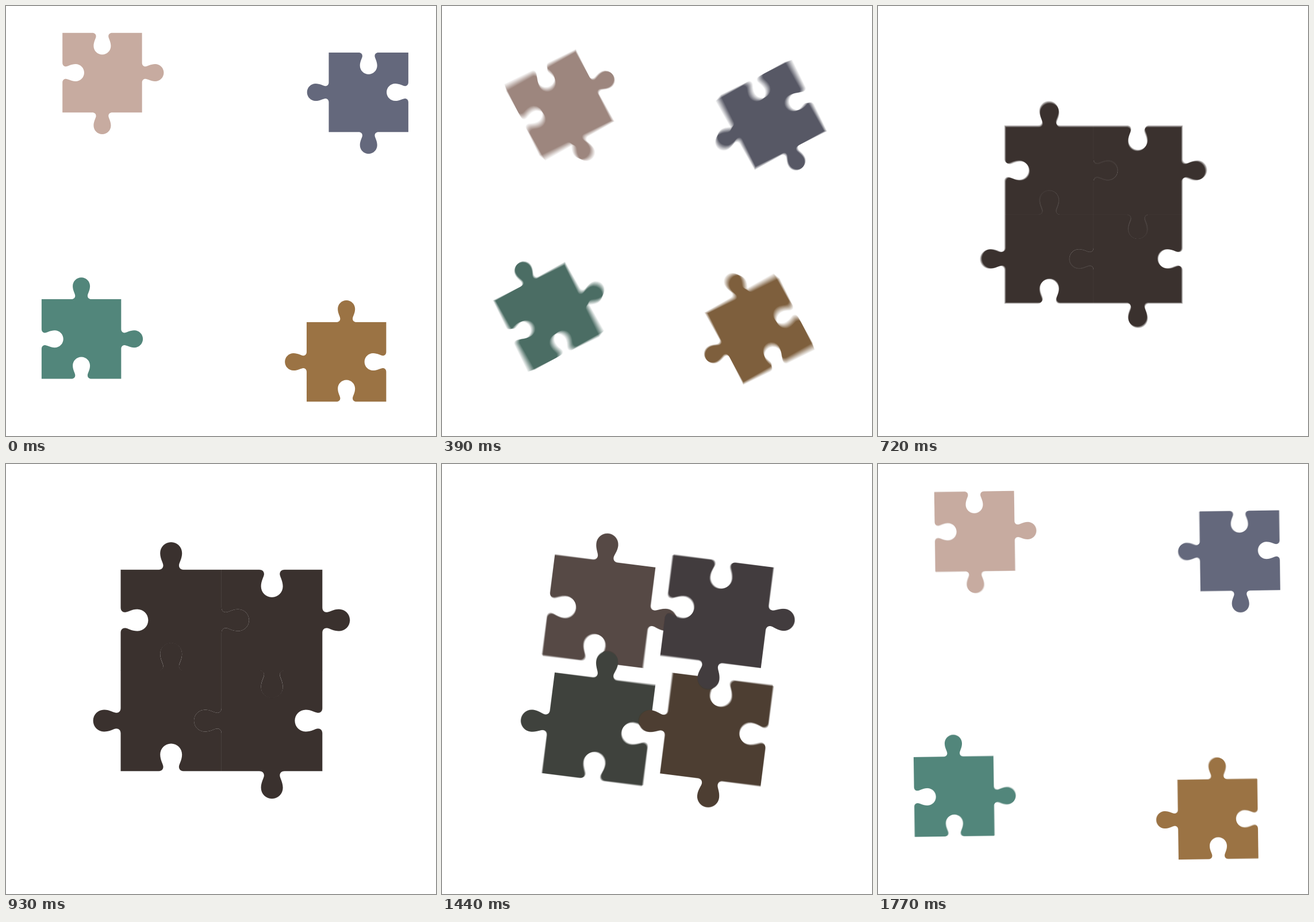
These frames come from a looping animation (748x748 px, 1.8 s). An HTML page with a canvas:

```html
<!DOCTYPE html>
<html lang="en">
<head>
<meta charset="utf-8">
<title>Puzzle pieces</title>
<style>
  html, body { margin: 0; width: 100%; height: 100%; overflow: hidden; background: #fff; }
  canvas { display: block; }
</style>
</head>
<body>
<canvas id="stage" width="748" height="748"></canvas>
<script>
const STAGE = 748, LOOP = 1800, STEP = 30;
const SHUTTER = 15, SAMPLES = 16;
const SMALL = 138.4, LARGE = 179.7;
const DARK = [58, 49, 46];
const TAB = 18.9; // half of a knob's length: from square centre to bounding-box centre

// x, y: scattered square centre; sx, sy: quadrant in the assembled puzzle
const pieces = [
  { x: 167.4, y: 116, sx: -1, sy: -1, color: [199, 171, 160] },
  { x: 131.1, y: 579.2, sx: -1, sy: 1, color: [82, 134, 123] },
  { x: 592.2, y: 619.1, sx: 1, sy: 1, color: [155, 115, 68] },
  { x: 630.7, y: 150.1, sx: 1, sy: -1, color: [100, 104, 124] }
];

const ctx = document.getElementById('stage').getContext('2d');
const layer = document.createElement('canvas');
layer.width = layer.height = STAGE;
const pen = layer.getContext('2d');

const mix = (a, b, p) => a + (b - a) * p;
const clamp = v => Math.min(1, Math.max(0, v));

// Cubic timing curve with flat ends: control points (a, 0) and (b, 1)
function ease(a, b) {
  return x => {
    if (x <= 0) return 0;
    if (x >= 1) return 1;
    let lo = 0, hi = 1;
    for (let i = 0; i < 30; i++) {
      const s = (lo + hi) / 2, r = 1 - s;
      if (3 * s * r * r * a + 3 * s * s * r * b + s * s * s < x) lo = s; else hi = s;
    }
    return 3 * lo * lo - 2 * lo * lo * lo;
  };
}
const travel = ease(0.97, 0.667);
const grow = ease(0.28, 0.03);

// Square outline with a knob (+1) or a notch (-1) on each side, centred on its bounding box
function outline(ox, oy) {
  const path = new Path2D(), h = SMALL / 2;
  const signs = [-oy, ox, oy, -ox];
  path.moveTo(-h - ox * TAB, -h - oy * TAB);
  signs.forEach((sign, k) => {
    const c = Math.round(Math.cos(k * Math.PI / 2)), s = Math.round(Math.sin(k * Math.PI / 2));
    // w runs along the side, d is the height above it
    const at = (w, d) => {
      const y = -h - sign * d;
      return [w * c - y * s - ox * TAB, w * s + y * c - oy * TAB];
    };
    const curve = (...p) => path.bezierCurveTo(...at(p[0], p[1]), ...at(p[2], p[3]), ...at(p[4], p[5]));
    path.lineTo(...at(-17.3, 0));
    curve(-13.2, 0, -10.8, 2.4, -10.8, 6);
    curve(-10.8, 9.5, -15, 15, -15, 22.8);
    curve(-15, 31.1, -8.3, 37.8, 0, 37.8);
    curve(8.3, 37.8, 15, 31.1, 15, 22.8);
    curve(15, 15, 10.8, 9.5, 10.8, 6);
    curve(10.8, 2.4, 13.2, 0, 17.3, 0);
    path.lineTo(...at(h, 0));
  });
  path.closePath();
  return path;
}

// Bounding-box centre of a piece inside the assembled puzzle
function joined(p, size, cx, cy, lap) {
  const h = size / 2, off = TAB * size / SMALL;
  return {
    x: cx + p.sx * h - p.sy * off,
    y: cy + p.sy * (h - lap) + p.sx * off,
    size, turn: -90
  };
}

for (const p of pieces) {
  p.path = outline(-p.sx, -p.sy);
  p.apart = { x: p.x - p.sx * TAB, y: p.y - p.sy * TAB, size: SMALL, turn: 0 };
  p.together = joined(p, SMALL, 375, 365.8, 0);
  p.enlarged = joined(p, LARGE, 374.9, 358.3, 0.25);
}

function pose(p, t) {
  const [from, to, k] =
    t < 600 ? [p.apart, p.together, travel(t / 600)] :
    t < 1200 ? [p.together, p.enlarged, grow((t - 600) / 600)] :
    [p.enlarged, p.apart, travel((t - 1200) / 600)];
  const at = key => mix(from[key], to[key], k);
  return { x: at('x'), y: at('y'), size: at('size'), turn: at('turn') };
}

function tint(p, t) {
  const k = t < 1200 ? clamp((t - 300) / 300) : 1 - clamp((t - 1380) / 300);
  return 'rgb(' + p.color.map((v, i) => Math.round(mix(v, DARK[i], k))).join(',') + ')';
}

function drawScene(t, colors) {
  pen.setTransform(1, 0, 0, 1, 0, 0);
  pen.fillStyle = '#fff';
  pen.fillRect(0, 0, STAGE, STAGE);
  pieces.forEach((p, i) => {
    const q = pose(p, t);
    pen.setTransform(1, 0, 0, 1, q.x, q.y);
    pen.rotate(q.turn * Math.PI / 180);
    pen.scale(q.size / SMALL, q.size / SMALL);
    pen.fillStyle = colors[i];
    pen.fill(p.path);
  });
}

// Motion blur: running average of the scene over the open shutter
function render(t) {
  const colors = pieces.map(p => tint(p, t));
  for (let i = 0; i < SAMPLES; i++) {
    const dt = ((i + 0.5) / SAMPLES - 0.5) * SHUTTER;
    drawScene((t + dt + LOOP) % LOOP, colors);
    ctx.globalAlpha = 1 / (i + 1);
    ctx.drawImage(layer, 0, 0);
  }
}

const start = performance.now();
let shown = -1;
function tick() {
  const t = Math.max(0, performance.now() - start) % LOOP;
  const now = Math.floor(t / STEP) * STEP;
  if (now !== shown) render(shown = now);
  requestAnimationFrame(tick);
}
tick();
</script>
</body>
</html>
```
